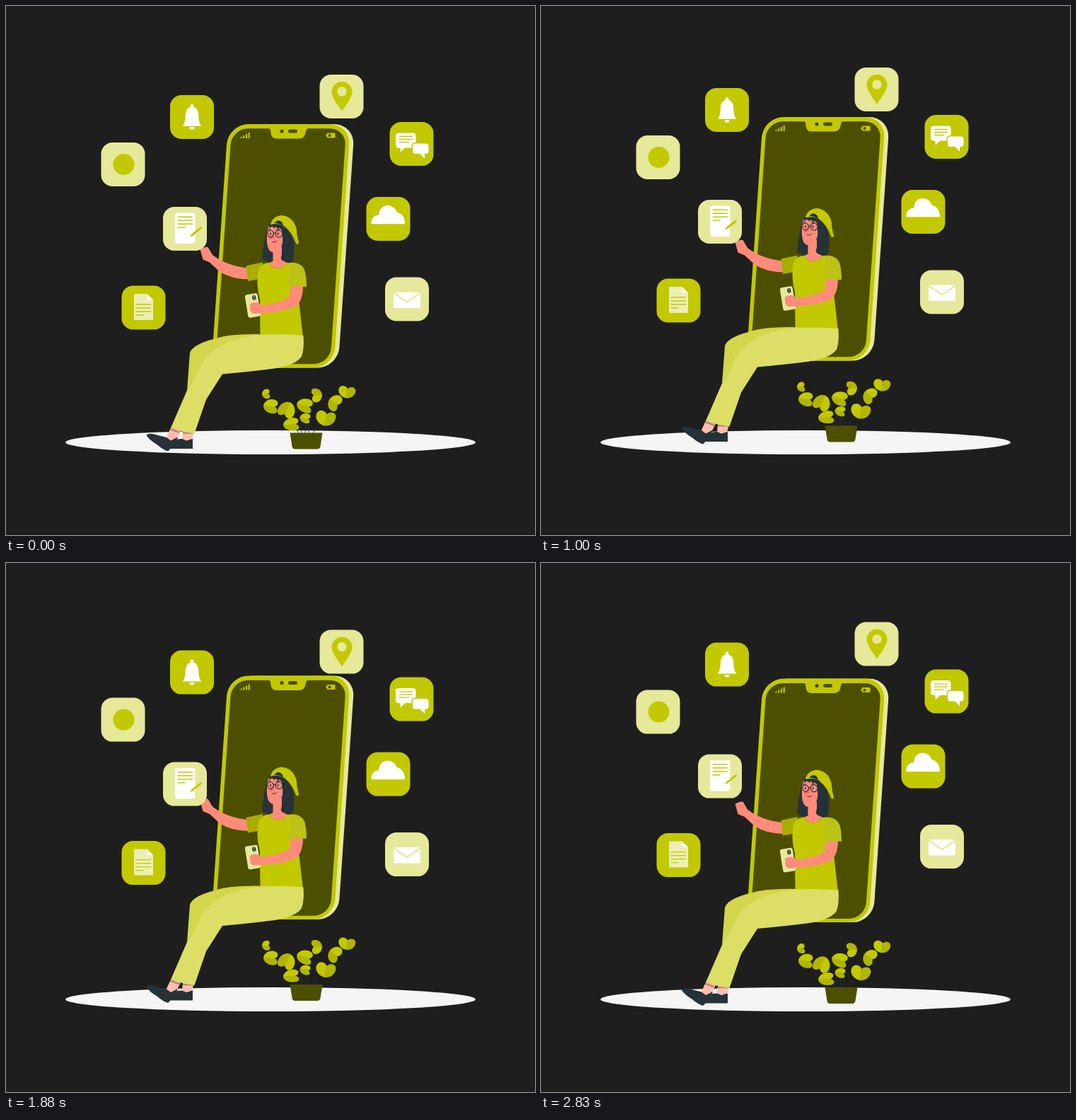
An HTML page with a canvas for the animation above (2.87 s loop, 748 px wide and 748 px high).

```html
<!DOCTYPE html>
<html lang="en">
<head>
<meta charset="utf-8">
<title>Floating apps</title>
<style>
html, body { margin: 0; width: 100%; height: 100%; overflow: hidden; background: #1e1e1e; }
canvas { display: block; width: 748px; height: 748px; }
</style>
</head>
<body>
<canvas id="stage" width="748" height="748"></canvas>
<script>
const ctx = document.getElementById('stage').getContext('2d');

const BG = '#1e1e1e', LIME = '#c2c900', PALE = '#e6e89a', OLIVE = '#4d4f00';
const SHADE = '#a8ad00', SLEEVE = '#bcc216', LEAF = '#b0b600';
const SKIN = '#ff8b7b', INK = '#263238', WHITE = '#fff';
const PANTS = '#dcde66', PANTS_BACK = '#d3d64a';

const LOOP = 2870, PERIOD = 1500, RISE = 15, APPS_DELAY = 500;

function fill(color, d) {
  ctx.fillStyle = color;
  ctx.fill(new Path2D(d));
}
function line(color, width, d) {
  ctx.strokeStyle = color;
  ctx.lineWidth = width;
  ctx.lineCap = 'round';
  ctx.lineJoin = 'round';
  ctx.stroke(new Path2D(d));
}
function box(color, x, y, w, h, r = 0) {
  ctx.fillStyle = color;
  ctx.beginPath();
  ctx.roundRect(x, y, w, h, r);
  ctx.fill();
}
function oval(color, x, y, rx, ry = rx) {
  ctx.fillStyle = color;
  ctx.beginPath();
  ctx.ellipse(x, y, rx, ry, 0, 0, Math.PI * 2);
  ctx.fill();
}
function at(x, y, draw) {
  ctx.save();
  ctx.translate(x, y);
  draw();
  ctx.restore();
}

// Linear up-and-down drift
function drift(t) {
  if (t <= 0) return 0;
  const p = (t % PERIOD) / PERIOD;
  return -RISE * (1 - Math.abs(1 - 2 * p));
}

function bigPhone() {
  ctx.save();
  ctx.transform(1, 0, -0.069, 1, 0.069 * 166.5, 0);
  box(PALE, 320, 166.5, 173.2, 344.5, 29);
  box(LIME, 314, 166.5, 173.2, 344.5, 29);
  box(OLIVE, 319.5, 172.8, 162.2, 333, 23);
  ctx.restore();

  fill(LIME, 'M372 172 Q374.500 174 374.500 179 Q375 187 383 187 H414 Q422 187 423.500 179 Q424 174 427 172 Z');
  oval(OLIVE, 390, 176.500, 2.600);
  box(OLIVE, 399, 174, 13, 5, 2.500);
  for (let i = 0; i < 4; i++) {
    const h = 2 + i * 2;
    box(LIME, 331.5 + i * 3.7, 186.5 - h, 2.2, h, 0.5);
  }
  box(LIME, 454, 179, 11.500, 7, 1);
  box(LIME, 452.500, 181, 2, 3, 0.500);
  box(OLIVE, 455.800, 180.800, 3.500, 3.500, 0.500);
}

function reachingArm() {
  fill(SKIN, 'M274.500 343.500 Q282 339.500 285.500 340.500 L292 351.500 Q312 367 342 370 L344 386 Q319 386 302 375 L288 362 L278.500 358 Z');
  fill(SHADE, 'M339.500 367 Q352 364 363 362 L361 385 L342 388.500 Z');
}

function head() {
  // hair behind the face
  fill(INK, 'M371 309 Q365 326 362 357 Q368 363 378 361 L392 362 Q401 366 406 360 Q409 342 406 326 Q402 306 384 304 Z');
  // neck and neckline
  fill(SKIN, 'M377.500 344 L390 340 L390 359 L397.500 362.500 Q394 370.500 383 370.500 Q375 370 373 362.500 L377.500 360 Z');
  fill(SKIN, 'M371 311 Q368 322 369 334 Q370 347 378 348 Q388 347 391 335 L394 313 Z');
  // fringe and side lock
  fill(INK, 'M371 315 L375 306 L392 306 Q400 318 402 332 L403 360 Q394 360 388.500 357 Q392 344 391.500 331 L390 316 L386 313 L386 316 L381 311 L380 314 L376 311 Z');
  // face details
  oval('#ff6257', 374.500, 327, 2.800, 2.500);
  oval(INK, 374, 321.500, 1, 1.700);
  oval(INK, 384.500, 321.500, 1, 1.700);
  line(INK, 1, 'M370 316.500 L374 315.500 M382 315.500 L387 316.500');
  line('#df5753', 0.9, 'M379.500 321 L377.500 327 L380 327.500');
  line(INK, 0.9, 'M376.500 333 Q381 334.500 383 331.500');
  line(INK, 1.1, 'M378.300 321.500 A4.200 4.700 0 1 1 369.900 321.500 A4.200 4.700 0 1 1 378.300 321.500 M391 321.500 A4.900 5 0 1 1 381.200 321.500 A4.900 5 0 1 1 391 321.500 M378.300 321 Q380 319.500 381.200 321 M391 320.500 L396 319');
  // backwards cap
  fill(LIME, 'M374 309 Q376 297 390 295.500 Q407 297.500 411 316 Q411 324 414 334 Q413.500 337.500 410.500 336 C405 324 399 311 388 308.500 Q381 306.500 374 309 Z');
  fill(INK, 'M379.500 306.500 Q382 302.500 386 303 Q391 304 392 310 Q386 306.500 379.500 306.500 Z');
  line(SHADE, 1, 'M394 311 Q406 321 411.500 335');
}

function body() {
  fill(LIME, 'M373 362.500 Q360 363 357 373 Q353 392 359 414 L359.500 468 H420 L414.500 420 L412 368 Q408 363 397.500 362.500 Q394 370.500 383 370.500 Q375 370 373 362.500 Z');
  // hand-held phone
  ctx.save();
  ctx.translate(349, 423);
  ctx.rotate(-0.16);
  box(PALE, -9, -16.500, 18, 33, 3);
  box(INK, 1, -14, 5, 6.500, 2);
  oval(PALE, 3.500, -12.300, 0.8);
  oval(PALE, 3.500, -9.500, 0.8);
  ctx.restore();
  fill(SKIN, 'M402 394 H420 Q420 420 407 425.500 Q387 433 362 434 L350 434.500 Q345 433 345 427 V421 Q350 417.500 356 419 L362 423 Q386 420 400 412 Q403 405 402 394 Z');
  fill(SLEEVE, 'M400.500 362.500 Q418 361 422.500 374 Q425 384 425 396.500 H400.500 Q402 380 400.500 362.500 Z');
}

function legs() {
  // ankles
  fill('#ffbdb0', 'M233 596 L247 600 L242 610 L232 616 L226 611 Z');
  fill('#ffbdb0', 'M250 600 H266 L263 613 H249 Z');
  line('#b88478', 2.5, 'M233.500 598 L244 602');
  line('#b88478', 2.5, 'M251 603 H264.500');
  // shoes
  fill(INK, 'M229 625.500 Q238 621 242 612 L249 611.500 L255 614 L264 611.500 V625.500 Z');
  fill(INK, 'M198.500 606 Q202 603 211 605.500 L227 609.500 L233 614 L243 609 L239 619 L229 629 Q222 627 214 620 Q201 612 198.500 606 Z');
  // trousers
  fill(PANTS_BACK, 'M370 464 Q320 462 295 470 Q264 478 260 490 L256 543 L290 520 L380 500 Z');
  fill(PANTS, 'M420.500 465.500 Q385 462.500 360 465 C325 467 295 480 280 500 C268 518 268 530 256 543 L233 596 Q250 602 266.500 604 L283 556 L306 520 Q350 516 380 512 Q410 507 418 495 Q422 484 420.500 465.500 Z');
}

// x, y, half width, half height, notch direction in degrees
const LEAVES = [
  [368, 548, 7, 6, 85], [375, 565.5, 10, 11, 95], [397, 571, 12, 12, 205],
  [404, 591, 9, 12, 85], [423, 564.5, 10, 12, 105], [423.5, 582.5, 7, 8, 100],
  [439, 550, 10, 8, 265], [452, 582, 14, 11, 12], [465, 560.5, 12, 9, 125],
  [482, 545, 12, 9, 10]
];

function plant() {
  line(INK, 0.9, 'M418 604 Q416 585 424 566 M423 604 L424 584 M428 604 Q426 570 438 552 M434 604 Q440 590 452 580 Q464 570 466 558 Q470 548 481 546 M414 604 Q402 582 394 570 L376 566 L368 549');
  for (const [x, y, w, h, turn] of LEAVES) {
    ctx.save();
    ctx.translate(x, y);
    ctx.rotate(turn * Math.PI / 180);
    ctx.scale(w, h);
    fill(LIME, 'M0.050 -0.450 C-0.250 -1.050 -1 -0.900 -1 -0.150 C-1 0.550 -0.450 1 0.050 1 Z');
    fill(LEAF, 'M0 -0.450 C0.350 -1.050 1 -0.950 1 -0.250 C1 0.450 0.550 1 0 1 Z');
    ctx.restore();
  }
  fill(OLIVE, 'M401.500 603 H447.500 L444.500 622 Q444 626 440 626 H409 Q405 626 404.500 622 Z');
}

function rows(top, x, full, short) {
  for (let i = 0; i < 4; i++) line(LIME, 1.4, `M${x} ${top + i * 5} h${i < 3 ? full : short}`);
}

const icons = {
  bell() {
    fill(WHITE, 'M17.500 43.800 Q21.700 40 21.700 30 C21.700 22 24.500 18 29 16.800 A2.500 2.500 0 1 1 33 16.800 C37.500 18 40.300 22 40.300 30 Q40.300 40 44.500 43.800 Z');
    fill(WHITE, 'M27.500 45.300 H34.500 A3.500 3.500 0 0 1 27.500 45.300 Z');
  },
  dot() {
    oval(LIME, 32, 31, 15);
  },
  paper() {
    box(WHITE, 17, 8.5, 28.500, 43.500, 3);
    rows(14.2, 21, 20.5, 10);
    line(LIME, 3, 'M42.500 38.500 L53.500 30');
    fill(LIME, 'M41 37.500 L43.500 40.500 L38 42.500 Z');
  },
  doc() {
    fill('#eceeb5', 'M17.500 11.500 H36 L44.500 20 V48.500 H17.500 Z');
    fill(WHITE, 'M36 11.500 L44.500 20 H36 Z');
    rows(26.5, 20.5, 20.5, 10);
  },
  pin() {
    fill(LIME, 'M31.500 52 C26 43 17 33 17 24.500 A14.500 14.500 0 0 1 46 24.500 C46 33 37 43 31.500 52 Z');
    oval(PALE, 31.500, 24, 6.700);
  },
  chat() {
    box(WHITE, 8.5, 15.5, 28.500, 21, 4);
    fill(WHITE, 'M14.500 35 H23 L15.500 43 Z');
    for (const [y, w] of [[20.5, 18], [24.5, 18], [28.5, 13]]) line(LIME, 1.3, `M14 ${y} h${w}`);
    const small = 'M36 30.500 H51 Q55 30.500 55 34.500 V41 Q55 45 51 45 H49.500 V51.500 L43 45 H36 Q32.500 45 32.500 41 V34.500 Q32.500 30.500 36 30.500 Z';
    line(LIME, 3, small);
    fill(WHITE, small);
  },
  cloud() {
    fill(WHITE, 'M7 38.300 Q6.500 27 17.500 25.500 Q19 12 30.500 12 Q40 12.500 43 21.500 Q54.500 24 54.500 38.300 Z');
  },
  mail() {
    box(WHITE, 12, 21, 38, 22.500, 1);
    line(PALE, 2, 'M12 22 L31 35 L50 22');
  }
};

const APPS = [
  ['bell', 232, 126, LIME], ['dot', 134.5, 193, PALE],
  ['paper', 222, 284, PALE], ['doc', 163.5, 395.5, LIME],
  ['pin', 443.5, 97, PALE], ['chat', 542.5, 164, LIME],
  ['cloud', 509.5, 270, LIME], ['mail', 536, 383.5, PALE]
];

function scene() {
  bigPhone();
  reachingArm();
  head();
  body();
  legs();
  plant();
}

function apps() {
  for (const [name, x, y, color] of APPS) {
    at(x, y, () => {
      box(color, 0, 0, 62, 62, 16);
      icons[name]();
    });
  }
}

function frame() {
  const t = performance.now() % LOOP;
  ctx.fillStyle = BG;
  ctx.fillRect(0, 0, 748, 748);
  oval('#f5f5f5', 374, 617, 290, 17);
  at(0, 0.5 + drift(t), scene);
  at(0, drift(t - APPS_DELAY), apps);
  requestAnimationFrame(frame);
}
frame();
</script>
</body>
</html>
```
